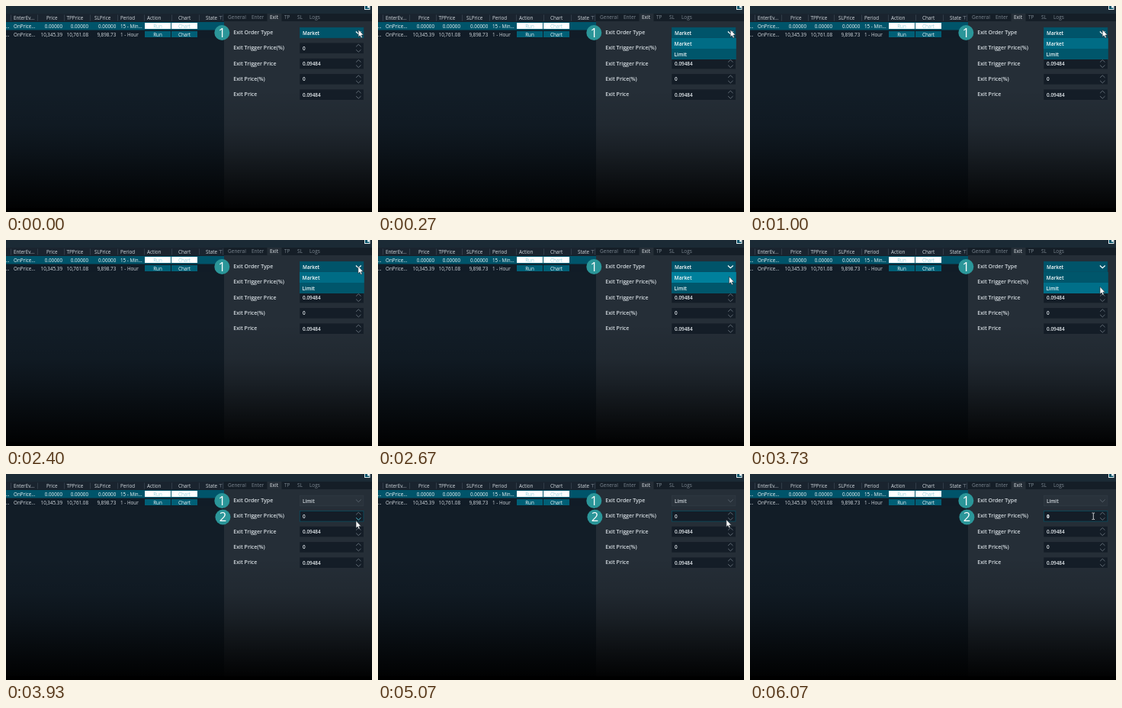
An HTML page for the animation above (8 s loop, 480x270 px).

```html
<!DOCTYPE html>
<html lang="en">
<head>
<meta charset="utf-8">
<title>Exit order settings</title>
<style>
  html, body { margin: 0; width: 100%; height: 100%; overflow: hidden; background: #000; }
  svg { display: block; width: 480px; height: 270px; font-family: "Open Sans", "Noto Sans", sans-serif; }
  text { white-space: pre; }
</style>
</head>
<body>
<svg id="stage" viewBox="0 0 480 270">
  <defs>
    <linearGradient id="shade" x1="0" y1="0" x2="0" y2="1">
      <stop offset="0" stop-color="#000" stop-opacity="0"/>
      <stop offset=".3" stop-color="#000" stop-opacity=".12"/>
      <stop offset=".5" stop-color="#000" stop-opacity=".32"/>
      <stop offset="1" stop-color="#000" stop-opacity=".94"/>
    </linearGradient>
  </defs>
</svg>
<script>
const stage = document.getElementById('stage');

function add(tag, attrs, parent = stage) {
  const el = document.createElementNS('http://www.w3.org/2000/svg', tag);
  for (const key in attrs) el.setAttribute(key, attrs[key]);
  return parent.appendChild(el);
}
const set = (el, attrs) => { for (const key in attrs) el.setAttribute(key, attrs[key]); };
const rect = (x, y, width, height, fill, more, parent) =>
  add('rect', { x, y, width, height, fill, ...more }, parent);
const line = (d, stroke, more, parent) =>
  add('path', { d, stroke, fill: 'none', ...more }, parent);
function text(str, x, y, size, fill, more, parent) {
  const el = add('text', { x, y, 'font-size': size, fill, ...more }, parent);
  el.textContent = str;
  return el;
}
const mid = { 'text-anchor': 'middle' };
const end = { 'text-anchor': 'end' };
const semi = { 'font-weight': 600 };

// Backgrounds
rect(0, 0, 480, 270, '#121d27');
rect(0, 0, 480, 10, '#1b2a35');
rect(0, 10, 286, 10.5, '#1a242f');
rect(286, 10, 194, 10, '#151e27');
rect(286, 20, 194, 250, '#252e37');
rect(0, 110, 480, 155, 'url(#shade)');
rect(0, 265, 480, 5, '#000');

// Window icon
rect(470.5, -2, 6.5, 6.5, '#00546a', { stroke: '#e4ecef', 'stroke-width': 1 });
rect(474, 0, 3, 2.5, '#e4ecef');

// Table
rect(0, 21, 286, 10.5, '#00546a');
rect(0, 32, 286, 10, '#111c27');
for (const x of [6, 41, 76, 110, 146, 181, 217, 253, 284]) rect(x, 11.5, .7, 8, '#3d4853');

const columns = [[10], [74, end], [108, end], [144.3, end], [150]];
const rows = [
  ['#f4f9fa', 'OnPrice...', '0.00000', '0.00000', '0.00000', '15 - Min...'],
  ['#d5dce1', 'OnPrice...', '10,345.39', '10,761.08', '9,898.73', '1 - Hour']
];
const headers = [['EnterEv...', 10], ['Price', 53], ['TPPrice', 79.5], ['SLPrice', 116],
  ['Period', 150], ['Action', 185], ['Chart', 226], ['State', 262]];
for (const [name, x] of headers) text(name, x, 17.5, 6.3, '#d5dce1');
line('M279.5 13.5h4M281.5 13.5v4', '#7d8790', { 'stroke-width': .6 });

rows.forEach(([color, ...cells], r) => {
  const y = 28.5 + r * 11;
  text('...', 4.5, y, 6.3, color, end);
  cells.forEach((cell, i) => text(cell, columns[i][0], y, 6.3, color, columns[i][1]));
  [['Run', 182], ['Chart', 217]].forEach(([name, x]) => {
    rect(x, y - 6.5, 34, 8, r ? '#005f76' : '#fff');
    text(name, x + 17, y, 6.3, r ? '#f2f7f8' : '#9bd3dd', mid);
  });
});

// Tabs
rect(342.5, 10, 19, 10.5, '#252e37');
for (const [name, x] of [['General', 291], ['Enter', 322], ['Exit', 346], ['TP', 365], ['SL', 382], ['Logs', 398]])
  text(name, x, 17.2, 6.5, name === 'Exit' ? '#e3e8ec' : '#7c8791');

// Settings form
const chevron = (x, y, w, h, color, width = .9) =>
  line(`M${x - w} ${y}l${w} ${h}l${w} ${-h}`, color, { 'stroke-width': width });

const labels = ['Exit Order Type', 'Exit Trigger Price(%)', 'Exit Trigger Price', 'Exit Price(%)', 'Exit Price'];
const values = ['', '0', '0.09484', '0', '0.09484'];
const fields = labels.map((label, i) => {
  const y = 35 + i * 20.3;
  text(label, 298.3, y + 2, 7, '#d5dce1', semi);
  if (!i) return null;
  const box = rect(385.3, y - 6.8, 83.6, 13.6, '#141d27', { 'stroke-width': .8 });
  const value = text(values[i], 389, y + 2.5, 6.4, '#e6ecf0', semi);
  chevron(462.3, y - 2, 3.2, -3, '#68737d');
  const down = chevron(462.3, y + 2, 3.2, 3, '#68737d');
  return { box, value, down };
});
const trigger = fields[1];

const combo = rect(385.3, 28.2, 83.6, 13.6, '#00546a', { 'stroke-width': .6 });
const choice = text('Market', 389, 37.5, 6.4, '#fff', semi);
const arrow = chevron(462.3, 33.5, 3.4, 3.2, '#fff', 1.2);

// Drop-down list
const popup = add('g', {});
const items = ['Market', 'Limit'].map((name, i) => {
  const box = rect(385, 42 + i * 14, 84.8, 14, '#00566b', {}, popup);
  text(name, 388.5, 51.5 + i * 14, 6.7, '#f6fafb', semi, popup);
  return box;
});

// Step badges
function badge(n, cx, cy) {
  const g = add('g', {});
  add('circle', { cx, cy, r: 10, fill: '#2b9699' }, g);
  text(n, cx, cy + 5.8, 16.5, '#fff', mid, g);
  return g;
}
badge('1', 283.3, 35);
const second = badge('2', 284.4, 56.5);

// Pointers
const pointer = add('path', {
  d: 'M0 0V9.6L2.1 7.7L3.6 11L5.2 10.3L3.8 7.1H6.7Z',
  fill: '#fff', stroke: '#18222b', 'stroke-width': .6
});
const beam = line('M-1.8 -4.2H-.5L0 -3.8L.5 -4.2H1.8M0 -3.8V3.8M-1.8 4.2H-.5L0 3.8L.5 4.2H1.8',
  '#f4f7f8', { 'stroke-width': .8 });

const ramp = (k, a, b) => Math.min(1, Math.max(0, (k - a) / (b - a)));
const mix = (a, b, p) => a + (b - a) * p;

const LOOP = 8000, STEP = 1000 / 15;

function draw(t) {
  const k = Math.floor((t + 3.4) / STEP);   // motion advances 15 times a second
  const open = k < 59;
  const drop = ramp(k, 35, 44), shift = ramp(k, 75, 79);
  const x = mix(mix(462.2, 459, drop), 450.3, shift);
  const y = mix(mix(31, 61.3, drop), 55.3, shift);
  const typing = k >= 78;

  set(pointer, { transform: `translate(${x} ${y})`, opacity: typing ? 0 : 1 });
  set(beam, { transform: `translate(${x} ${y})`, opacity: typing ? 1 : 0 });

  set(popup, { opacity: ramp(k, 0, 4) * (1 - ramp(k, 57, 59)) });
  const pressed = k >= 56;
  const onMarket = y >= 42 && y < 56, onLimit = y >= 56;
  set(items[0], { fill: pressed ? '#00566b' : onMarket ? '#00809c' : '#006c85' });
  set(items[1], { fill: pressed ? '#006f89' : onLimit ? '#00809c' : '#00566b' });

  set(combo, { fill: open ? '#00546a' : '#29323b', stroke: open ? '#00546a' : '#333c46' });
  choice.textContent = open ? 'Market' : 'Limit';
  set(choice, { fill: open ? '#fff' : '#d5dce1' });
  set(arrow, { stroke: open ? '#fff' : '#5b6670', 'stroke-width': open ? 1.2 : .9 });

  set(second, { opacity: ramp(k, 57, 59) });
  set(trigger.box, { stroke: open ? 'none' : '#0a4c5f' });
  set(trigger.value, { 'font-weight': typing ? 800 : 600 });
  set(trigger.down, { stroke: !open && k < 76 ? '#4fc3d6' : '#68737d' });
}

const start = performance.now();
function tick() {
  draw((performance.now() - start) % LOOP);
  requestAnimationFrame(tick);
}
tick();
</script>
</body>
</html>
```
